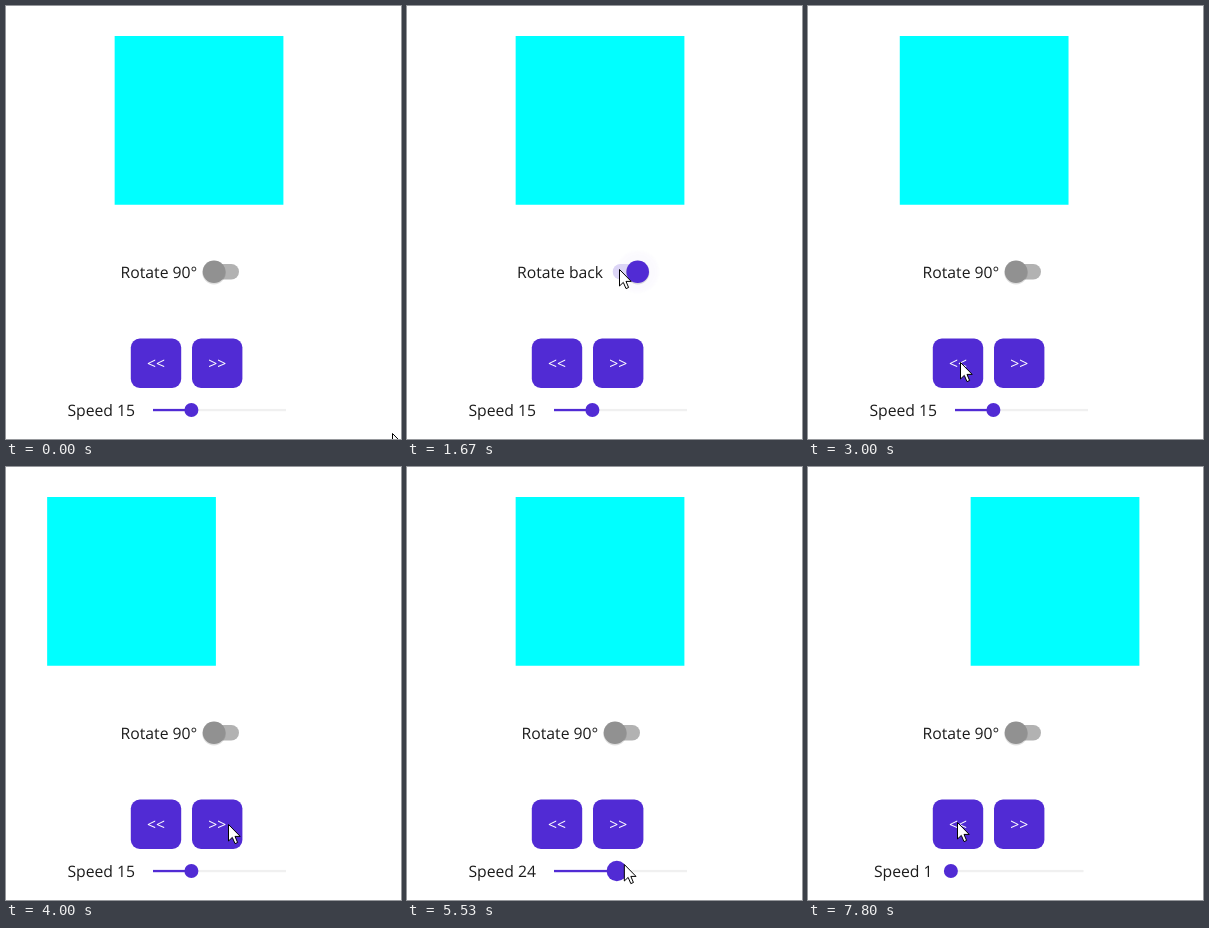
Write an HTML page that moves like this. It is 395x433 px and loops after 8 s.

```html
<!DOCTYPE html>
<html lang="en">
<head>
<meta charset="utf-8">
<title>Rotate and move</title>
<style>
  html, body { margin: 0; width: 100%; height: 100%; overflow: hidden; background: #fff; }
  svg { display: block; width: 100%; height: 100%; }
  text { font: 15.75px "Open Sans", "Noto Sans", sans-serif; fill: #1c1c1c; text-rendering: geometricPrecision; }
  .btn rect { fill: #512bd4; }
  .btn text { fill: #fff; text-anchor: middle; }
  #halo { filter: blur(1.5px); }
</style>
</head>
<body>
<svg viewBox="0 0 395 433">
  <rect id="box" y="30" width="168.75" height="168.75" fill="#0ff"/>

  <text id="label" y="271.5"></text>
  <g id="switch">
    <circle id="halo" cy="265.7" r="21" fill="#512bd4"/>
    <rect id="track" x="201" y="258" width="32" height="15.5" rx="7.75"/>
    <circle id="shade" cy="266.6" r="11.8" fill="#000" opacity=".13"/>
    <circle id="thumb" cy="265.7" r="11.3"/>
  </g>

  <g class="btn">
    <rect x="124.8" y="332.5" width="50.4" height="49.5" rx="9"/>
    <text x="150" y="363">&lt;&lt;</text>
    <rect x="186" y="332.5" width="50.4" height="49.5" rx="9"/>
    <text x="211.2" y="363">&gt;&gt;</text>
  </g>

  <text id="speed" y="410"></text>
  <g id="slider">
    <rect x="147" y="402.9" width="133" height="2.3" fill="#f0f0f0"/>
    <rect id="fill" x="147" y="402.9" height="2.3" fill="#512bd4"/>
    <circle id="knob" cy="404" fill="#512bd4"/>
  </g>

  <path id="cursor" d="M.5 .5V17L4.3 13.4L7 19.6L9.6 18.5L7 12.4H12.2Z" fill="#fff" stroke="#000"/>
</svg>
<script>
const LOOP = 8000, FPS = 15, UNIT = 1.125, HOME = 108.65, HALF = 84.375;
const ON = 1207, OFF = 2107, TURN = 250, SLIDE = 280;
const UP = [5230, 5510], DOWN = [6850, 7460];

const $ = id => document.getElementById(id);
const clamp = (v, max = 1) => Math.min(max, Math.max(0, v));
const part = (t, a, b) => clamp((t - a) / (b - a));
const ease = p => (1 - Math.cos(Math.PI * p)) / 2;
const tween = (t, a, b) => ease(part(t, a, b));
const set = (id, attrs) => {
  for (const k in attrs) $(id).setAttribute(k, attrs[k]);
};

// Clicks made so far in an evenly timed series
const clicks = (t, start, gap, n) => clamp(Math.floor((t - start) / gap) + 1, n);
const knobX = v => 147.4 + (v - 1) * 133 / 49;
const speedAt = t => 15 + 9 * tween(t, ...UP) - 23 * tween(t, ...DOWN);

// Pointer moves: start, end, x, y, sag of the path
const moves = [
  [10, 600, 212, 263],
  [2010, 2130, 221, 273],
  [2290, 2730, 152, 356],
  [3560, 3960, 222, 357, 22],
  [4680, 5060, knobX(15) + 7, 400],
  [...UP, knobX(24) + 7, 397],
  [5580, 5800, 212, 358],
  [6430, 6660, knobX(24) - 8, 407],
  [...DOWN, knobX(1) - 8, 400],
  [7530, 7790, 149, 355]
];

function pointer(t) {
  let x = 386, y = 427;
  for (const [a, b, toX, toY, sag = 0] of moves) {
    const p = tween(t, a, b);
    x += (toX - x) * p;
    y += (toY - y) * p + sag * Math.sin(Math.PI * p);
  }
  return `${x} ${y}`;
}

function drawBox(t) {
  const steps = 15 * (clicks(t, 4080, 180, 4) - clicks(t, 2960, 180, 4))
    + 24 * clicks(t, 5980, 400, 2);
  const x = HOME + steps * UNIT;
  const angle = 90 * (part(t, ON, ON + TURN) - part(t, OFF, OFF + TURN));
  set("box", { x, transform: `rotate(${angle} ${x + HALF} ${30 + HALF})` });
}

function drawSwitch(t) {
  const on = t >= ON && t < OFF;
  const since = t - (t >= OFF ? OFF : ON);
  const cx = 208 + 18 * (tween(t, ON, ON + SLIDE) - tween(t, OFF, OFF + SLIDE));
  const glow = part(since, 0, 160) * (1 - part(since, 200, 600));
  $("label").textContent = on ? "Rotate back" : "Rotate 90°";
  set("label", { x: on ? 109.9 : 114.5 });
  set("switch", { transform: `translate(${on ? 4.7 : 0} 0)` });
  set("halo", { cx, opacity: .04 * glow });
  set("shade", { cx });
  set("thumb", { cx, fill: on ? "#512bd4" : "#919191" });
  set("track", { fill: on ? "#dcd5f6" : "#b2b2b2" });
}

function drawSlider(t) {
  const value = speedAt(t), shown = Math.round(value);
  const shift = shown < 10 ? 4.5 : 0;
  const held = [UP, DOWN].some(([a, b]) => t > a && t < b + 70);
  const cx = knobX(value);
  $("speed").textContent = "Speed " + shown;
  set("speed", { x: 61.4 + shift });
  set("slider", { transform: `translate(${-shift} 0)` });
  set("fill", { width: cx - 147 });
  set("knob", { cx, r: held ? 10.2 : 7 });
}

function draw(t) {
  drawBox(t);
  drawSwitch(t);
  drawSlider(t);
  set("cursor", { transform: `translate(${pointer(t)})` });
}

const start = performance.now();
function tick() {
  const t = (performance.now() - start) % LOOP;
  draw(Math.floor(t * FPS / 1000 + .1) * 1000 / FPS);
  requestAnimationFrame(tick);
}
tick();
</script>
</body>
</html>
```
